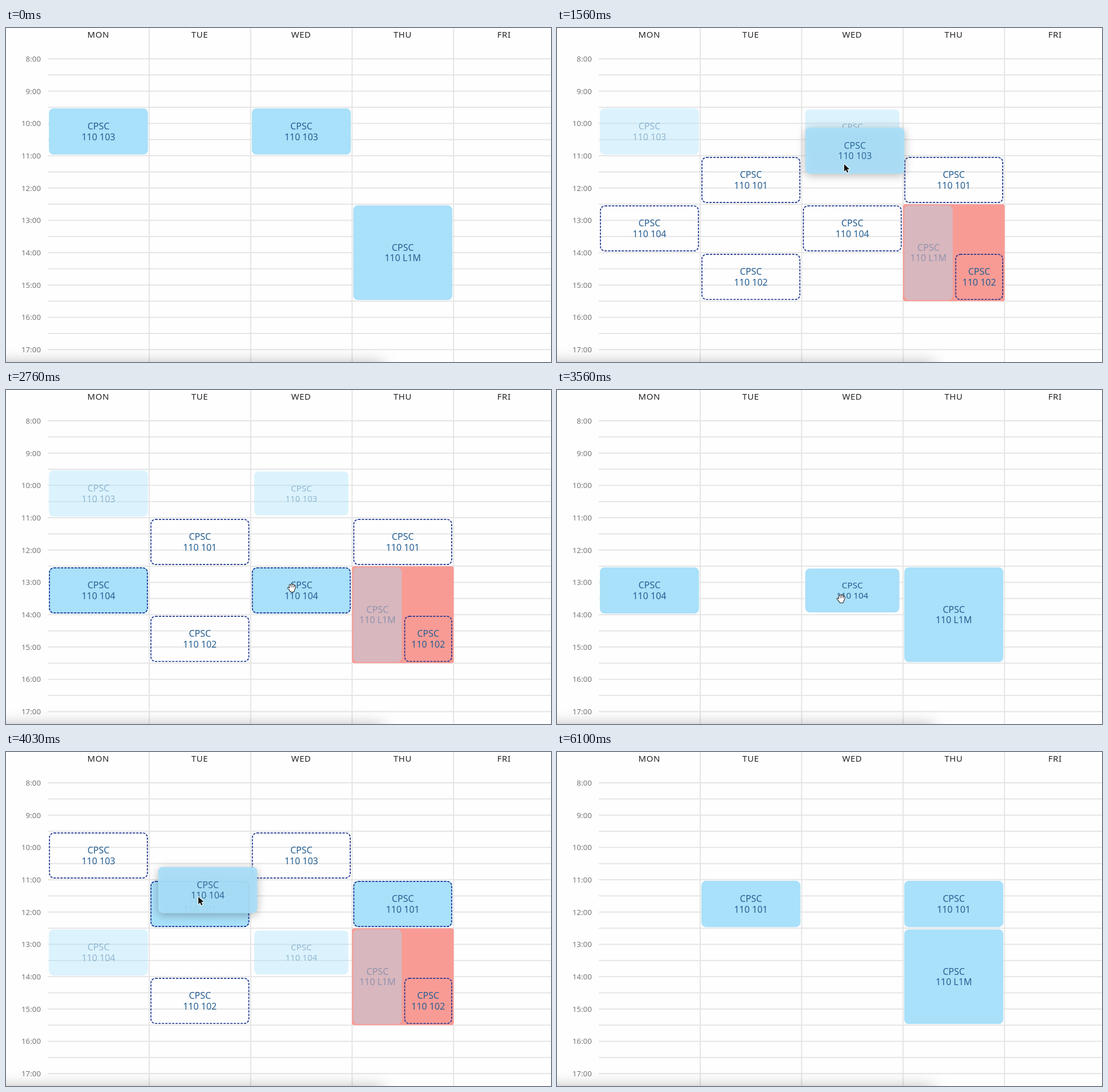
An HTML page with a canvas that plays this animation: 955 px wide and 586 px high, repeating every 6360 ms.

```html
<!DOCTYPE html>
<html lang="en">
<head>
<meta charset="utf-8">
<title>Weekly timetable</title>
<style>
  html, body { margin: 0; width: 100%; height: 100%; overflow: hidden; background: #fefefe; }
  canvas { display: block; }
</style>
</head>
<body>
<canvas id="stage" width="955" height="586"></canvas>
<script>
const ctx = document.getElementById('stage').getContext('2d');
const LOOP = 6360, TICK = 200 / 3;
const LEFT = 73.2, COL = 177.75, TOP = 54, HOUR = 56.7;
const BLUE = '#a9e0fa', INK = '#265f92', NAVY = '#1d3590', RED = '#f89b95';
const FONT = '"Noto Sans", "Open Sans", sans-serif';
const DAYS = ['MON', 'TUE', 'WED', 'THU', 'FRI'];

const SECTIONS = {
  101: { days: [1, 3], from: 11, to: 12.5 },
  102: { days: [1, 3], from: 14, to: 15.5 },
  103: { days: [0, 2], from: 9.5, to: 11 },
  104: { days: [0, 2], from: 12.5, to: 14 }
};

// Each move: press, lift, drop and commit times; dx, dy offset the lifted card from the pointer.
const MOVES = [
  { from: 103, to: 104, press: 1090, lift: 1480, drop: 2755, commit: 2890, dx: 4.5, dy: -1 },
  { from: 104, to: 101, press: 3420, lift: 3625, drop: 4550, commit: 4690, dx: -3, dy: 2.5 }
];

// Pointer path: time, x, y
const PATH = [
  [690, 514, 604], [1090, 503, 204], [1430, 503, 204], [1830, 503.5, 338],
  [2230, 501, 346], [2760, 501, 347], [3360, 498, 366], [3570, 498, 366],
  [4030, 337, 254], [4360, 339, 263], [5500, 339, 263], [6030, 372, -20]
];

const hourY = h => TOP + (h - 8) * HOUR;
const smooth = u => u * u * (3 - 2 * u);

function pointerAt(t) {
  const i = PATH.findIndex(p => p[0] > t);
  if (i < 1) return null;
  const [a, b] = [PATH[i - 1], PATH[i]];
  const u = smooth((t - a[0]) / (b[0] - a[0]));
  return { x: a[1] + (b[1] - a[1]) * u, y: a[2] + (b[2] - a[2]) * u };
}

function slot(day, from, to) {
  return { x: LEFT + day * COL + 2, y: hourY(from) + 2, w: COL - 4.2, h: (to - from) * HOUR - 4 };
}

function sectionSlots(id) {
  const s = SECTIONS[id];
  return s.days.map(day => slot(day, s.from, s.to));
}

const inside = (p, r) => p.x >= r.x && p.x <= r.x + r.w && p.y >= r.y && p.y <= r.y + r.h;
const overSection = (p, id) => p && sectionSlots(id).some(r => inside(p, r));

function roundRect(r, radius) {
  ctx.beginPath();
  ctx.roundRect(r.x, r.y, r.w, r.h, radius);
}

function text(str, x, y, font, color, align = 'center') {
  ctx.font = font + ' ' + FONT;
  ctx.fillStyle = color;
  ctx.textAlign = align;
  ctx.fillText(str, x, y);
}

function card(r, label, { fill = BLUE, dashed = false, alpha = 1, scale = 1, shadow = false } = {}) {
  const cx = r.x + r.w / 2, cy = r.y + r.h / 2;
  ctx.save();
  ctx.globalAlpha = alpha;
  ctx.translate(cx, cy);
  ctx.scale(scale, scale);
  ctx.translate(-cx, -cy);
  if (fill) {
    ctx.save();
    if (shadow) {
      ctx.shadowColor = 'rgba(0,0,0,.3)';
      ctx.shadowBlur = 16;
      ctx.shadowOffsetY = 3;
    }
    roundRect(r, 8);
    ctx.fillStyle = fill;
    ctx.fill();
    ctx.restore();
  }
  if (dashed) {
    roundRect({ x: r.x + 1, y: r.y + 1, w: r.w - 2, h: r.h - 2 }, 8);
    ctx.strokeStyle = NAVY;
    ctx.lineWidth = 1.7;
    ctx.setLineDash([4, 2]);
    ctx.stroke();
  }
  text('CPSC', cx, cy - 3.6, '16px', INK);
  text('110 ' + label, cx, cy + 15, '16px', INK);
  ctx.restore();
}

function grid() {
  ctx.fillStyle = '#fefefe';
  ctx.fillRect(0, 0, 955, 586);
  ctx.fillStyle = '#e5e5e5';
  for (let i = 0; i < 19; i++) ctx.fillRect(LEFT, TOP + i * HOUR / 2 - 1, 955, 2);
  for (let c = 1; c < 5; c++) ctx.fillRect(LEFT + c * COL - 1, 0, 2, 586);
  ctx.letterSpacing = '0.5px';
  DAYS.forEach((d, c) => text(d, LEFT + (c + .5) * COL - .4, 17.3, '500 15px', '#252525'));
  ctx.letterSpacing = '0px';
  for (let h = 8; h < 18; h++) text(h + ':00', 61, hourY(h) + 4.8, '13.3px', '#777', 'right');
}

function bottomShadow() {
  ctx.save();
  ctx.shadowColor = 'rgba(0,0,0,.34)';
  ctx.shadowBlur = 28;
  ctx.fillRect(-60, 590, 720, 60);
  ctx.restore();
}

function arrow(p) {
  ctx.save();
  ctx.translate(p.x, p.y);
  ctx.beginPath();
  [[0, 0], [0, 13], [3, 10.2], [5.2, 15], [7.4, 14], [5.3, 9.3], [9.4, 9]]
    .forEach(([x, y]) => ctx.lineTo(x, y));
  ctx.closePath();
  ctx.lineJoin = 'round';
  ctx.strokeStyle = '#fff';
  ctx.lineWidth = 2;
  ctx.stroke();
  ctx.fillStyle = '#111';
  ctx.fill();
  ctx.restore();
}

function hand(p) {
  const fingers = [[-3.4, -4.4], [-.5, -5.6], [2.5, -5], [5.3, -2.6], [-6, .6]];
  ctx.save();
  ctx.translate(p.x, p.y);
  ctx.lineCap = ctx.lineJoin = 'round';
  const palm = () => {
    ctx.beginPath();
    [[-2.6, 0], [4, 0], [3.6, 4], [2.8, 6.4], [-1.8, 6.4], [-4, 3]].forEach(([x, y]) => ctx.lineTo(x, y));
    ctx.closePath();
  };
  for (const [color, grow] of [['#222', 2], ['#fff', 0]]) {
    ctx.strokeStyle = ctx.fillStyle = color;
    fingers.forEach(([x, y], i) => {
      ctx.lineWidth = 1.9 + grow;
      ctx.beginPath();
      ctx.moveTo(x, y);
      ctx.lineTo(i === 4 ? -2 : x * .75, i === 4 ? 4 : 2);
      ctx.stroke();
    });
    ctx.lineWidth = 1 + grow;
    palm();
    ctx.stroke();
    ctx.fill();
  }
  ctx.restore();
}

function choices(current, pointer) {
  const lab = slot(3, 12.5, 15.5);
  ctx.fillStyle = RED;
  roundRect({ x: lab.x - 2.2, y: lab.y - 2, w: COL + .6, h: lab.h + 4 }, 4);
  ctx.fill();
  card({ ...lab, w: 85 }, 'L1M', { alpha: .4 });
  for (const id of [101, 102, 103, 104]) {
    if (id === current) continue;
    const fill = overSection(pointer, id) ? BLUE : null;
    sectionSlots(id).forEach((r, i) => {
      const clash = id === 102 && i === 1;
      card(clash ? { ...r, x: r.x + 89.2, w: r.w - 89.2 } : r, id, { fill, dashed: true });
    });
  }
}

function draw(t) {
  const pointer = pointerAt(t);
  const current = MOVES.reduce((id, m) => t >= m.commit ? m.to : id, 103);
  const move = MOVES.find(m => t >= m.press && t < m.commit);
  const picking = move && t >= move.lift;
  const dragging = picking && t < move.drop;

  grid();
  sectionSlots(current).forEach((r, i) => card(r, current, {
    alpha: picking ? .4 : 1,
    scale: move && i === 1 ? .95 : 1
  }));
  if (picking) choices(current, pointer);
  else card(slot(3, 12.5, 15.5), 'L1M');

  if (dragging) {
    const r = sectionSlots(current)[1];
    const start = pointerAt(move.lift - 100);
    r.x += pointer.x - start.x + move.dx;
    r.y += pointer.y - start.y + move.dy;
    card(r, current, { alpha: .92, shadow: true });
  }
  bottomShadow();
  if (pointer) {
    const overCard = overSection(pointer, current) || (picking && overSection(pointer, move.to));
    (overCard && !dragging ? hand : arrow)(pointer);
  }
}

function frame() {
  const t = performance.now() % LOOP;
  draw(Math.max(0, 30 + Math.floor((t - 22) / TICK) * TICK));
  requestAnimationFrame(frame);
}
frame();
</script>
</body>
</html>
```
